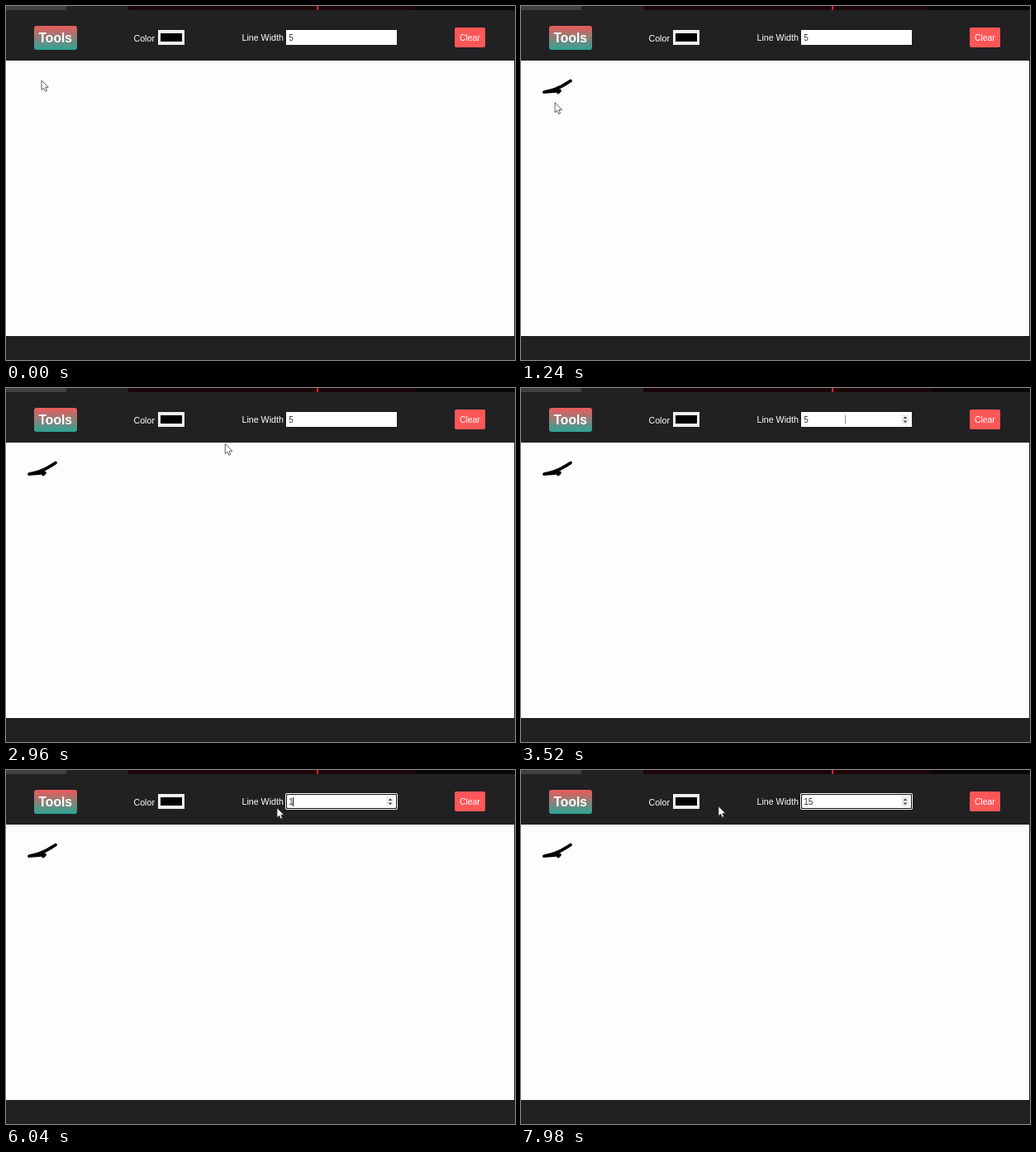
Recreate the animation shown at these times as an HTML page with a canvas. Size 616 by 428 pixels, loop 8000 ms.

```html
<!DOCTYPE html>
<html lang="en">
<head>
<meta charset="utf-8">
<title>Drawing pad</title>
<style>
html, body { margin: 0; width: 100%; height: 100%; overflow: hidden; background: #212123; }
canvas { display: block; }
</style>
</head>
<body>
<canvas id="stage" width="616" height="428"></canvas>
<script>
const ctx = document.getElementById('stage').getContext('2d');
const LOOP = 8000;
const SANS = '"Liberation Sans", Arial, sans-serif';
const DARK = '#212123', PAPER = '#fdfdfd', WHITE = '#fff';

// times of the user's actions
const DRAW_FROM = 260, DRAW_TO = 820;
const FOCUS = 4280, SELECT = 4480, TYPE_1 = 5760, TYPE_5 = 6240;
const BLINK = 500;

// pointer stops after drawing: time, x, y
const stops = [
  [DRAW_TO, 45, 104], [1240, 41, 117], [1600, 58, 169], [2300, 152, 170],
  [2960, 265, 68], [3520, 393, 38], [3780, 468, 38], [FOCUS, 352, 38],
  [4600, 328, 46], [7440, 328, 46], [7960, 239, 44]
];

const arrow = new Path2D('M0 0V11.5L2.7 9.2 4.5 13.2 6.5 12.3 4.8 8.4 8.2 8.2Z');
const chevron = new Path2D('M-2.5 0L0 -2.8 2.5 0Z');

const mix = (a, b, k) => a + (b - a) * k;
const progress = (t, from, to) => Math.min(1, Math.max(0, (t - from) / (to - from)));

// one sweep down to the left, then a short return with a hook
function pen(u) {
  if (u < 0.55) {
    const k = u / 0.55;
    return [mix(60, 28, k), mix(90.5, 104, k) + 2.2 * Math.sin(Math.PI * k)];
  }
  const k = (u - 0.55) / 0.45;
  const back = Math.min(1, k / 0.8), hook = Math.max(0, k - 0.8) / 0.2;
  return [mix(28, 47, back) - 2 * hook, mix(104, 102.5, back) + 2 * hook];
}

function pointer(t) {
  if (t < DRAW_FROM) {
    const k = progress(t, 40, DRAW_FROM);
    return [mix(43, 60, k), 90];
  }
  if (t < DRAW_TO) return pen(progress(t, DRAW_FROM, DRAW_TO));
  const i = Math.max(1, stops.findIndex(s => s[0] > t));
  if (t >= stops.at(-1)[0]) return stops.at(-1).slice(1);
  const [t0, x0, y0] = stops[i - 1], [t1, x1, y1] = stops[i];
  const k = progress(t, t0, t1);
  return [mix(x0, x1, k), mix(y0, y1, k)];
}

function box(x, y, w, h, fill, r = 0) {
  ctx.fillStyle = fill;
  ctx.beginPath();
  ctx.roundRect(x, y, w, h, r);
  ctx.fill();
}

function text(s, x, y, fill = WHITE, size = 10.67, weight = '') {
  ctx.font = `${weight} ${size}px ${SANS}`;
  ctx.fillStyle = fill;
  ctx.fillText(s, x, y);
}

function drawPage() {
  box(0, 0, 616, 428, DARK);
  box(0, 0, 616, 5, '#0a0506');
  box(0, 0, 73, 5, '#414141');
  box(73, 0, 75, 5, '#222');
  box(148, 0, 347, 5, '#1c0509');
  box(376, 0, 2, 5, '#e8202c');
  box(0, 66, 615, 333, PAPER);

  const g = ctx.createLinearGradient(0, 24, 0, 53);
  g.addColorStop(0, '#ec5a5a');
  g.addColorStop(1, '#2ca596');
  box(34, 24, 52, 29, g, 3);
  text('Tools', 39.5, 44, WHITE, 15.6, 'bold');

  text('Color', 154.5, 43);
  box(184, 29, 32, 18, '#f0f0f0');
  box(187, 33, 26, 10, '#000');
  text('Line Width', 285.5, 42);
  box(543, 26, 37, 24, '#ff5757', 2);
  text('Clear', 549, 42, WHITE, 10.4);
}

function drawField(t, x, y) {
  const focused = t >= FOCUS;
  const hover = x > 339 && x < 473 && y > 29 && y < 47;
  if (focused) {
    box(338, 28, 136, 20, WHITE, 2);
    box(339, 29, 134, 18, '#101010', 1);
    box(340, 30, 132, 16, WHITE, 1);
  } else {
    box(339, 29, 134, 18, WHITE);
  }

  const selected = t >= SELECT && t < TYPE_1;
  if (selected) box(342, 33, 6, 11, '#2f86d0');
  const value = t < TYPE_1 ? '5' : t < TYPE_5 ? '1' : '15';
  text(value, 342.3, 42, selected ? WHITE : '#333', 10);

  const caret = focused && !selected && t < TYPE_5 + BLINK;
  if (caret) box(Math.round(342 + 5.4 * value.length), 33, 1, 11, '#111');

  if (focused || hover) {
    box(460, 32, 9, 12, '#efefef');
    for (const flip of [1, -1]) {
      ctx.save();
      ctx.translate(465, 38.2 - 1.2 * flip);
      ctx.scale(1, flip);
      ctx.fillStyle = '#505050';
      ctx.fill(chevron);
      ctx.restore();
    }
  }
  return hover && x < 460;
}

function drawStroke(t) {
  const end = progress(t, DRAW_FROM, DRAW_TO);
  if (!end) return;
  ctx.beginPath();
  for (let u = 0; u < end; u += 0.01) ctx.lineTo(...pen(u));
  ctx.lineTo(...pen(end));
  ctx.strokeStyle = '#000';
  ctx.lineWidth = 3.8;
  ctx.lineCap = ctx.lineJoin = 'round';
  ctx.stroke();
}

function drawPointer(x, y, beam) {
  if (beam) {
    box(Math.round(x) - 1, y - 5, 1, 10, '#888');
    return;
  }
  ctx.save();
  ctx.translate(x, y);
  ctx.fillStyle = WHITE;
  ctx.fill(arrow);
  ctx.strokeStyle = '#333';
  ctx.lineWidth = 0.8;
  ctx.lineJoin = 'miter';
  ctx.stroke(arrow);
  ctx.restore();
}

function frame(t) {
  const [x, y] = pointer(t);
  drawPage();
  drawStroke(t);
  const beam = drawField(t, x, y);
  drawPointer(x, y, beam);
}

const start = performance.now();
function tick() {
  frame((performance.now() - start) % LOOP);
  requestAnimationFrame(tick);
}
tick();
</script>
</body>
</html>
```
